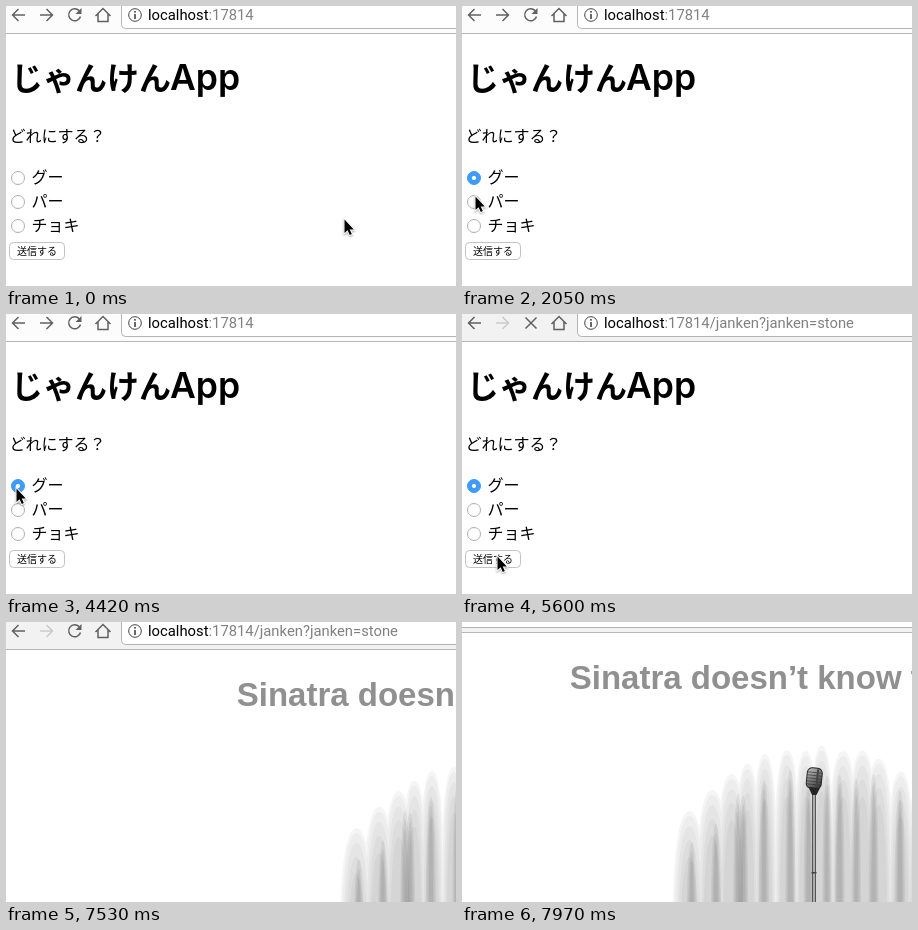
Recreate the animation shown at these times as an HTML page with a canvas. Size 450 by 280 pixels, loop 8000 ms.

```html
<!DOCTYPE html>
<html lang="ja">
<head>
<meta charset="utf-8">
<title>じゃんけんApp</title>
<style>
  html, body { margin: 0; width: 100%; height: 100%; overflow: hidden; background: #fff; }
  canvas { display: block; width: 450px; height: 280px; }
</style>
</head>
<body>
<canvas id="stage" width="450" height="280"></canvas>
<script>
const ctx = document.getElementById('stage').getContext('2d');
const LOOP = 8000, TICK = 147.4, LEAD = 17;
const JP = '"Noto Sans CJK JP", "Noto Sans CJK", sans-serif';
const URL_FONT = '14.8px Roboto, sans-serif';
const OPTIONS = ['グー', 'パー', 'チョキ'];

// All times below are in ticks; each click selects the next option in turn.
const CLICKS = [11, 16, 23, 30], SUBMIT = 38, LOADED = 39, PAN = 53;
const START = { x: 338, y: 213 };
const MOVES = [
  { from: 0, to: 8, x: 8, y: 182 },
  { from: 8, to: 10, x: 13, y: 170 },
  { from: 12, to: 14, x: 13, y: 190 },
  { from: 17, to: 21, x: 13, y: 215 },
  { from: 24, to: 29, x: 10, y: 174 },
  { from: 31, to: 36, x: 35, y: 242 },
  { from: 41, to: 44, x: 408, y: 164 },
  { from: 44, to: 47, x: 298, y: 1 },
  { from: 48, to: 51, x: 298, y: -30 }
];

const clamp = u => Math.min(1, Math.max(0, u));
const smooth = u => u * u * (3 - 2 * u);
const grey = v => `rgb(${v},${v},${v})`;

function pointerAt(tick) {
  let { x, y } = START;
  for (const move of MOVES) {
    const u = smooth(clamp((tick - move.from) / (move.to - move.from)));
    x += (move.x - x) * u;
    y += (move.y - y) * u;
  }
  return [x, y];
}

function seededRandom(seed) {
  return () => (seed = seed * 16807 % 2147483647) / 2147483647;
}

function text(str, x, y, font, color = '#000') {
  ctx.font = font;
  ctx.fillStyle = color;
  ctx.fillText(str, x, y);
}

function stroke(d, color, width = 1) {
  ctx.strokeStyle = color;
  ctx.lineWidth = width;
  ctx.stroke(new Path2D(d));
}

function fill(d, color) {
  ctx.fillStyle = color;
  ctx.fill(new Path2D(d));
}

function rect(x, y, w, h, color) {
  ctx.fillStyle = color;
  ctx.fillRect(x, y, w, h);
}

function roundBox(x, y, w, h, r, color, outline) {
  ctx.beginPath();
  ctx.roundRect(x, y, w, h, r);
  ctx.fillStyle = color;
  ctx.fill();
  ctx.strokeStyle = outline;
  ctx.lineWidth = 1;
  ctx.stroke();
}

const disc = (x, y, r, color, outline = color) =>
  roundBox(x - r, y - r, 2 * r, 2 * r, r, color, outline);

function toolbar(submitted, loading) {
  const ink = '#606060';
  rect(0, 0, 700, 27, submitted ? '#f2f2f2' : '#fcfcfc');
  rect(0, 27, 700, 1, '#b6b6b6');
  roundBox(115.5, -8.5, 600, 31, 4, '#fff', '#b4b4b4');

  stroke('M19 9H7M12.5 3L6.5 9L12.5 15', ink, 1.5);
  stroke('M34 9H46M40.5 3L46.5 9L40.5 15', submitted ? '#cbcbcb' : ink, 1.5);
  if (loading) {
    stroke('M63.5 3.5L74.5 14.5M74.5 3.5L63.5 14.5', ink, 1.5);
  } else {
    stroke('M73.2 4.8A6 6 0 1 0 74.5 10.5', ink, 1.5);
    fill('M75.5 2V8H69.5Z', ink);
  }
  stroke('M89.5 10L97 2.5L104.5 10M92 8V15.5H102V8', ink, 1.5);

  disc(129, 9, 6.3, '#fff', '#444');
  rect(128.2, 5, 1.6, 1.7, '#444');
  rect(128.2, 8, 1.6, 5, '#444');

  text('localhost', 142, 14, URL_FONT, '#000');
  const hostWidth = ctx.measureText('localhost').width;
  text(':17814' + (submitted ? '/janken?janken=stone' : ''), 142 + hostWidth, 14, URL_FONT, '#808080');
}

function formPage(choice) {
  text('じゃんけん', 5, 84, `bold 32px ${JP}`);
  text('App', 164, 84, '600 35.5px Inter, sans-serif');
  text('どれにする？', 3.5, 136, `16px ${JP}`);
  OPTIONS.forEach((label, i) => {
    const y = 172 + 24 * i;
    if (i === choice) {
      disc(12, y, 6.5, '#3d9bfa');
      disc(12, y, 1.7, '#fff');
    } else {
      disc(12, y, 6.5, '#fff', '#aeaeae');
    }
    text(label, 25.5, y + 4.5, `16px ${JP}`);
  });
  roundBox(3.5, 236.5, 55, 17, 4, '#fff', '#c2c2c2');
  text('送信する', 11, 249, `500 10px ${JP}`);
}

// A tall strip with a pointed, rounded top that hangs below the stage.
function drape(x, half, top, color) {
  const l = x - half, r = x + half;
  fill(`M${l} 320C${l} ${top + 50} ${x - half * 0.7} ${top} ${x} ${top}
        C${x + half * 0.7} ${top} ${r} ${top + 50} ${r} 320Z`, color);
}

function curtain() {
  const random = seededRandom(41);
  const centre = 475, reach = 122;
  const archTop = x => 139 + 72 * Math.abs((x - centre) / 131) ** 2.5;
  const folds = Array.from({ length: 14 }, (_, i) => {
    const x = centre + reach * (i / 6.5 - 1) + 5 * (random() - 0.5);
    return { x, top: archTop(x) + 9 * random(), half: 12 + 5 * random() };
  });
  for (let level = 0; level < 5; level++) {
    for (const { x, top, half } of folds) {
      drape(x, half * (1 - 0.12 * level), top + 5 * level ** 1.6, grey(245 - 8 * level));
    }
  }
  for (const { x, top, half } of folds) {
    const side = x + half * (random() - 0.5), depth = top + 14 + 20 * random();
    for (let i = 0; i < 3; i++) drape(side, 5 - 1.4 * i, depth + 9 * i, 'rgba(90,90,90,0.1)');
  }
}

function microphone() {
  rect(473, 187, 4, 130, '#555');
  rect(474.2, 187, 1.6, 130, '#c4c4c4');
  rect(472.5, 267, 5, 1.5, '#444');
  fill('M469 181L481 183L477.5 190H473Z', '#252525');
  ctx.save();
  ctx.translate(475.3, 173);
  ctx.rotate(0.1);
  const metal = ctx.createLinearGradient(-8, -8, 8, 8);
  metal.addColorStop(0, '#c0c0c0');
  metal.addColorStop(1, '#383838');
  roundBox(-7.5, -10, 15, 20, [5, 5, 4, 4], metal, '#222');
  for (let y = -6; y < 8; y += 3) rect(-7, y, 14, 1, 'rgba(30,30,30,0.55)');
  rect(2, -9, 2, 18, '#444');
  ctx.restore();
}

function missingPage() {
  text('Sinatra doesn’t know this ditty.', 230.7, 84.3,
       'bold 33px "Liberation Sans", Arial, sans-serif', '#909090');
  curtain();
  microphone();
}

function pointer(x, y) {
  ctx.save();
  ctx.translate(x, y);
  const arrow = 'M0.5 0.5V14L3.6 11.2L5.8 16L7.8 15.1L5.7 10.4H9.8Z';
  ctx.shadowColor = 'rgba(0,0,0,0.35)';
  ctx.shadowBlur = 2;
  ctx.shadowOffsetY = 1;
  stroke(arrow, '#fff', 2);
  ctx.shadowColor = 'transparent';
  fill(arrow, '#000');
  ctx.restore();
}

function draw(time) {
  const tick = Math.floor((time % LOOP + LEAD) / TICK);
  const clicked = CLICKS.filter(t => t <= tick).length;
  const pan = clamp((tick - PAN + 1) / 2);

  ctx.setTransform(1, 0, 0, 1, 0, 0);
  rect(0, 0, 450, 280, '#fff');
  ctx.translate(-Math.round(123 * pan), -Math.round(17 * pan));
  toolbar(tick >= SUBMIT, tick === SUBMIT);
  if (tick < LOADED) formPage(clicked ? (clicked - 1) % OPTIONS.length : -1);
  else missingPage();
  pointer(...pointerAt(tick));
}

const start = performance.now();
function frame() {
  draw(performance.now() - start);
  requestAnimationFrame(frame);
}
frame();
</script>
</body>
</html>
```
